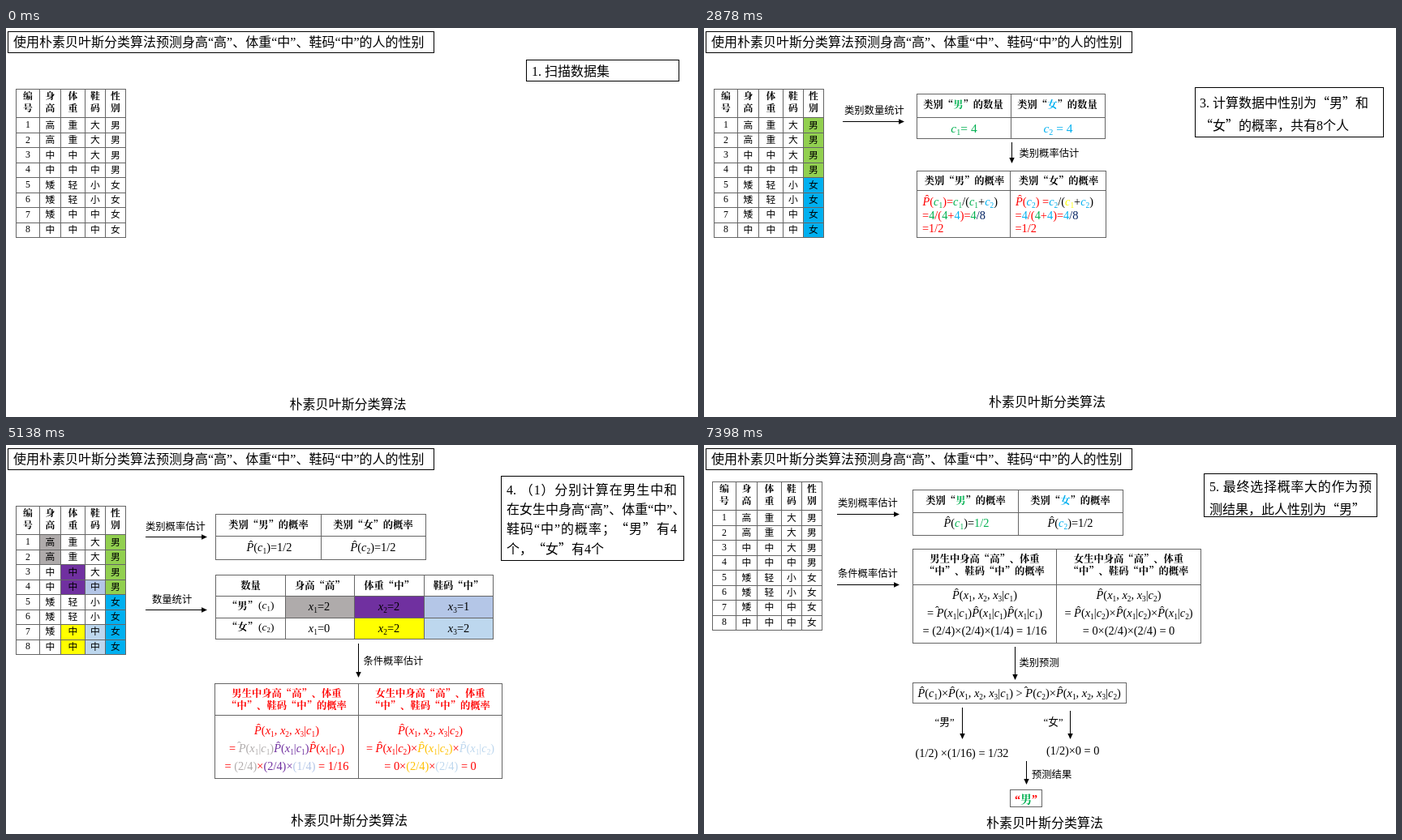
Animation of 853x480 px, one loop 7.85 s. Source, as an HTML page:

```html
<!DOCTYPE html>
<html lang="zh-CN">
<head>
<meta charset="utf-8">
<title>朴素贝叶斯分类算法</title>
<style>
  html, body { margin: 0; width: 100%; height: 100%; overflow: hidden; background: #fff; }
  svg { display: block; width: 853px; height: 480px; }
  svg, .note {
    font-family: "Liberation Serif", "Noto Sans CJK SC", serif;
    text-spacing-trim: space-all;
  }
  text { white-space: pre; }
  .wide { font-family: "Noto Sans CJK SC", serif; line-height: 0; }
  .bold { font-weight: 700; font-family: "Liberation Serif", "Noto Serif CJK SC", "Noto Sans CJK SC", serif; }
  .bold .wide { font-family: "Noto Serif CJK SC", "Noto Sans CJK SC", serif; }
  .note div { height: 24px; font-size: 16px; line-height: 24px; white-space: nowrap; position: absolute; left: 0; right: 0; }
  .note .full { text-align: justify; text-align-last: justify; }
</style>
</head>
<body>
<svg id="stage" viewBox="0 0 853 480"></svg>
<script>
const NS = 'http://www.w3.org/2000/svg';
const stage = document.getElementById('stage');
const RULE = '#666';
const INK = {
  k: '#000', r: '#f00', g: '#00b050', b: '#00b0f0', y: '#ffff00', o: '#ffc000',
  a: '#afabab', p: '#7030a0', l: '#b4c6e7', s: '#bdd7ee', m: '#92d050', n: '#002060'
};
let layer = stage;

function add(tag, attrs, parent = layer) {
  const el = document.createElementNS(NS, tag);
  for (const k in attrs) el.setAttribute(k, attrs[k]);
  parent.appendChild(el);
  return el;
}

// Markup: {r ...} colours a run, 「」 are full-width quotes, c1/x2 get a
// subscript, P is P-hat and p is P with its hat slipped to the left.
function text(x, y, str, size = 14.4, { mid = false, bold = false, ink = 'k' } = {}) {
  const el = add('text', {
    x, y, 'font-size': size, fill: INK[ink],
    'text-anchor': mid ? 'middle' : 'start', class: bold ? 'bold' : ''
  });
  let dx = 0, dy = 0, fill = INK[ink];
  const run = (s, attrs = {}) => {
    add('tspan', { dx, dy, fill, ...attrs }, el).textContent = s;
    dx = dy = 0;
  };
  for (const t of str.match(/\{\w |\}|[「」]|[cx]\d|[Pp]|[^{}「」cxPp]+/g)) {
    if (t[0] === '{') fill = INK[t[1]];
    else if (t === '}') fill = INK[ink];
    else if (t === '「' || t === '」') run(t === '「' ? '“' : '”', { class: 'wide' });
    else if (/[cx]\d/.test(t)) {
      run(t[0], { 'font-style': 'italic' });
      dy = size * 0.19;
      run(t[1], { 'font-size': size * 0.65 });
      dy = -size * 0.19;
    } else if (t === 'P' || t === 'p') {
      const back = size * (t === 'P' ? 0.4 : 0.73);
      run('P', { 'font-style': 'italic' });
      dx = -back; dy = -size * 0.19;
      run('ˆ');
      dx = back - size * 0.333; dy = size * 0.19;
    } else run(t);
  }
}

const label = (x, cy, s, size = 12.3) => text(x, cy + size * 0.38, s, size);
const head = (x, cy, s, ink) => text(x, cy + 4.6, s, 12.3, { mid: true, bold: true, ink });
const cell = (x, y, s, ink) => text(x, y, s, 14.4, { mid: true, ink });

function box(x0, y0, x1, y1, stroke = '#000') {
  add('rect', { x: x0, y: y0, width: x1 - x0, height: y1 - y0, fill: 'none', stroke });
}

function paint(xs, ys, col, row, key) {
  add('rect', {
    x: xs[col], y: ys[row], width: xs[col + 1] - xs[col],
    height: ys[row + 1] - ys[row], fill: INK[key]
  });
}

function grid(xs, ys) {
  const [x0, x1, y0, y1] = [xs[0], xs.at(-1), ys[0], ys.at(-1)];
  const d = xs.map(x => `M${x} ${y0}V${y1}`).join('') + ys.map(y => `M${x0} ${y}H${x1}`).join('');
  add('path', { d, stroke: RULE, fill: 'none', 'stroke-linecap': 'square' });
}

function arrow(x0, y0, x1, y1) {
  const across = y0 === y1;
  const [ex, ey] = across ? [x1 - 5, y1] : [x1, y1 - 5];
  add('path', { d: `M${x0} ${y0}L${ex} ${ey}`, stroke: '#000' });
  add('path', { d: across ? `M${x1} ${y1}l-7 -3.2v6.4z` : `M${x1} ${y1}l-3.2 -7h6.4z` });
}

// Lines that start with | are justified to the full width.
function note(rect, x, right, cy, pitch, lines) {
  box(...rect);
  const fo = add('foreignObject', { x, y: 0, width: right - x, height: 160, style: 'overflow:visible' });
  const wrap = document.createElement('div');
  wrap.className = 'note';
  wrap.style.cssText = 'position:relative;height:160px';
  lines.forEach((line, i) => {
    const div = document.createElement('div');
    div.style.top = cy - 11.4 + i * pitch + 'px';
    if (line[0] === '|') div.className = 'full';
    div.innerHTML = line.replace('|', '')
      .replace(/「/g, '<span class="wide">“</span>')
      .replace(/」/g, '<span class="wide">”</span>');
    wrap.appendChild(div);
  });
  fo.appendChild(wrap);
}

const PEOPLE = ['高重大男', '高重大男', '中中大男', '中中中男', '矮轻小女', '矮轻小女', '矮中中女', '中中中女'];
const SEX = ['4 1 m', '4 2 m', '4 3 m', '4 4 m', '4 5 b', '4 6 b', '4 7 b', '4 8 b'];
const TRAITS = [...SEX, '1 1 a', '1 2 a', '2 3 p', '2 4 p', '3 4 l', '2 7 y', '2 8 y', '3 7 s', '3 8 s'];

function people(fills = [], dx = 0, dy = 0) {
  const xs = [12.5, 41.5, 67.5, 97.5, 122.5, 147.5].map(x => x + dx);
  const ys = [75.5];
  for (let i = 0; i < 9; i++) ys.push(Math.round(110 + i * 18.5) + 0.5);
  const rows = ys.map(y => y + dy);
  const put = (col, cy, s, bold) =>
    text((xs[col] + xs[col + 1]) / 2, cy + 4.4, s, 11.8, { mid: true, bold });
  for (const f of fills) {
    const [c, r, key] = f.split(' ');
    paint(xs, rows, +c, +r, key);
  }
  grid(xs, rows);
  ['编号', '身高', '体重', '鞋码', '性别'].forEach((s, c) => {
    put(c, 84 + dy, s[0], true);
    put(c, 99 + dy, s[1], true);
  });
  PEOPLE.forEach((p, r) => {
    const cy = 119.3 + r * 18.45 + dy;
    put(0, cy - 0.6, String(r + 1));
    [...p].forEach((s, c) => put(c + 1, cy, s));
  });
}

const tint = (on, key, s) => on ? `{${key} ${s}}` : s;

function counts(ys, headY, base) {
  grid([262.5, 378.5, 494.5], ys);
  head(319.5, headY, '类别「{g 男}」的数量');
  head(435.5, headY, '类别「{b 女}」的数量');
  text(320.5, base, 'c1= 4', 15.5, { mid: true, ink: 'g' });
  text(436.5, base, 'c2 = 4', 15.5, { mid: true, ink: 'b' });
}

function priors(x, ys, headY, base, color) {
  grid([x, x + 130, x + 259], ys);
  head(x + 65, headY, `类别「${tint(color, 'g', '男')}」的概率`);
  head(x + 194, headY, `类别「${tint(color, 'b', '女')}」的概率`);
  cell(x + 66, base, `P(${tint(color, 'g', 'c1')})=${tint(color, 'g', '1/2')}`);
  cell(x + 194, base, `P(${tint(color, 'b', 'c2')})=1/2`);
}

function traits(ink) {
  const xs = [258.5, 344.5, 429.5, 515.5, 600.5], ys = [160.5, 186.5, 213.5, 239.5];
  [[1, 1, 'a'], [2, 1, 'p'], [3, 1, 'l'], [2, 2, 'y'], [3, 2, 's']].forEach(f => paint(xs, ys, ...f));
  grid(xs, ys);
  ['数量', '身高「高」', '体重「中」', '鞋码「中」'].forEach((s, i) => head(301.5 + i * 85.3, 173, s));
  ['男', '女'].forEach((sex, r) => {
    const cy = 198 + r * 26.5;
    head(291.5, cy, `「${sex}」`, ink);
    text(311, cy + 4, `(c${r + 1})`, 13.5, { ink });
  });
  ['221', '022'].forEach((row, r) => [...row].forEach((n, i) =>
    cell(386 + i * 86, 204 + r * 27, `x${i + 1}=${n}`, ink)));
}

function likelihood(xs, ys, headY, base, color) {
  const ink = color ? 'r' : 'k';
  const t = (key, s) => tint(color, key, s);
  const [a, b] = [(xs[0] + xs[1]) / 2, (xs[1] + xs[2]) / 2];
  grid(xs, ys);
  [[a, '男'], [b, '女']].forEach(([x, sex]) => {
    head(x, headY, sex + '生中身高「高」、体重', ink);
    head(x, headY + 15, '「中」、鞋码「中」的概率', ink);
  });
  const A = 'P(x1|c1)', B = 'P(x1|c2)';
  cell(a, base, 'P(x1, x2, x3|c1)', ink);
  cell(a, base + 22, `= ${t('a', 'p(x1|c1)')}${t('p', A)}${A}`, ink);
  cell(a, base + 44, `= ${t('a', '(2/4)')}×${t('p', '(2/4)×')}${t('l', '(1/4)')} = 1/16`, ink);
  cell(b, base, 'P(x1, x2, x3|c2)', ink);
  cell(b, base + 22, `= ${B}×${t('o', B)}×${t('s', B)}`, ink);
  cell(b, base + 44, `= 0×${t('o', '(2/4)')}×${t('s', '(2/4)')} = 0`, ink);
}

const COMPARE = 'P(c1)×P(x1, x2, x3|c1) > p(c2)×P(x1, x2, x3|c2)';
const MALE = '(1/2) ×(1/16) = 1/32', FEMALE = '(1/2)×0 = 0';
const caption = (x, cy) => label(x, cy, '朴素贝叶斯分类算法', 16);

const scenes = [
  [1070, () => {
    people();
    note([641.5, 39.5, 829.5, 65.5], 648, 824, 53, 24, ['1. 扫描数据集']);
    caption(349.5, 464);
  }],
  [1130, () => {
    people(SEX);
    label(165, 96, '类别数量统计');
    arrow(165, 109.5, 240, 109.5);
    counts([77.5, 105.5, 132.5], 90, 124);
    note([635.5, 45.5, 822.5, 98.5], 641, 816, 62, 24.5, ['|2. 统计数据中性别为', '「男」和「女」的数量']);
    caption(349.5, 464);
  }],
  [1130, () => {
    people(SEX);
    label(173, 101, '类别数量统计');
    arrow(171, 115.5, 247, 115.5);
    counts([81.5, 110.5, 136.5], 94, 129);
    arrow(379.5, 141, 379.5, 167);
    label(388.5, 154.5, '类别概率估计');
    grid([262.5, 377.5, 495.5], [176.5, 200.5, 258.5]);
    head(321, 188, '类别「男」的概率');
    head(437, 188, '类别「女」的概率');
    text(269.5, 219, '{r P(}{g c1}{r )=}{g c1}/({g c1}+{b c2})');
    text(269, 235.5, '{r =}{g 4}{r /(}{g 4}{r +}{b 4}{r )=}{g 4}{n /8}');
    text(384, 219, '{r P(}{b c2}{r ) =}{b c2}/({y c1}+{b c2})');
    text(383.5, 235.5, '{r =}{b 4}{r /(}{g 4}{r +}{b 4}{r )=}{b 4}{n /8}');
    text(269, 252, '=1/2', 14.4, { ink: 'r' });
    text(383.5, 252, '=1/2', 14.4, { ink: 'r' });
    note([605.5, 73.5, 837.5, 134.5], 611, 832, 92, 28, ['3. 计算数据中性别为「男」和', '「女」的概率，共有8个人']);
    caption(351, 461);
  }],
  [1130, () => {
    people(TRAITS);
    label(172, 98, '类别概率估计');
    arrow(169, 113.5, 246, 113.5);
    priors(258.5, [85.5, 112.5, 141.5], 98, 131);
    label(180, 190, '数量统计');
    arrow(167, 205.5, 244, 205.5);
    traits('r');
    note([610.5, 44.5, 838.5, 122.5], 617, 831, 61, 24.3,
      ['|3. 分别统计在男生中和在女生', '|中身高「高」、体重「中」、', '鞋码「中」的数量']);
    caption(355, 464.5);
  }],
  [1130, () => {
    people(TRAITS);
    label(172, 100, '类别概率估计');
    arrow(172, 113.5, 248, 113.5);
    priors(258.5, [85.5, 112.5, 141.5], 98, 131);
    label(180, 190, '数量统计');
    arrow(172, 203.5, 248, 203.5);
    traits('k');
    arrow(434.5, 245, 434.5, 287);
    label(440.5, 266.5, '条件概率估计');
    likelihood([257.5, 434.5, 611.5], [294.5, 333.5, 411.5], 306.5, 357, true);
    note([610.5, 38.5, 835.5, 142.5], 617, 827, 55, 24.4,
      ['|4. （1）分别计算在男生中和', '在女生中身高“高”、体重“中”、', '|鞋码“中”的概率；「男」有4', '个，「女」有4个']);
    caption(351, 463);
  }],
  [1130, () => {
    people();
    label(166, 99.5, '类别概率估计');
    arrow(166, 114.5, 242, 114.5);
    priors(258.5, [85.5, 112.5, 140.5], 98, 131, true);
    label(166, 187.5, '条件概率估计');
    arrow(166, 202.5, 242, 202.5);
    likelihood([258.5, 436.5, 612.5], [157.5, 201.5, 274.5], 169.5, 219);
    arrow(384.5, 280, 384.5, 321);
    label(390.5, 301.5, '类别预测');
    box(261.5, 327.5, 525.5, 352.5, RULE);
    text(268, 344, COMPARE, 14.4, { ink: 'r' });
    arrow(322.5, 357, 322.5, 396);
    arrow(457.5, 358, 457.5, 396);
    label(282, 374, '{r “}{g 男}{r ”}', 12.8);
    label(421.5, 374, '{r “}{b 女}{r ”}', 12.8);
    text(265, 417.5, MALE, 14.3, { ink: 'm' });
    text(428, 416, FEMALE, 14.3, { ink: 'b' });
    note([599.5, 39.5, 832.5, 142.5], 605, 827, 55, 24.4,
      ['|4. （2）比较此人性别为「男」', '|和「女」时，身高为「高」、', '|体重为「中」、鞋码为「中」', '的概率，概率大这为预测结果']);
    caption(349, 464);
  }],
  [1130, () => {
    people([], -2, -30);
    label(165, 71, '类别概率估计');
    arrow(164, 85.5, 241, 85.5);
    priors(257.5, [55.5, 83.5, 111.5], 68, 101, true);
    label(165, 158.5, '条件概率估计');
    arrow(164, 172.5, 241, 172.5);
    likelihood([257.5, 434.5, 612.5], [128.5, 172.5, 244.5], 140.5, 190);
    arrow(383.5, 249, 383.5, 290);
    label(388.5, 268.5, '类别预测');
    box(257.5, 293.5, 520.5, 318.5, RULE);
    text(263.5, 311, COMPARE);
    arrow(318.5, 324, 318.5, 363);
    arrow(451.5, 328, 451.5, 363);
    label(284.5, 341.5, '“男”', 12.8);
    label(418.5, 341.5, '“女”', 12.8);
    text(260.5, 384.5, MALE, 14.3);
    text(422, 382, FEMALE, 14.3);
    arrow(397.5, 390, 397.5, 419);
    label(404, 406, '预测结果');
    box(377.5, 425.5, 416.5, 446.5, RULE);
    text(397, 442, '{r “}{g 男}{r ”}', 14, { mid: true, bold: true });
    note([616.5, 35.5, 829.5, 88.5], 623, 823, 51, 28, ['|5. 最终选择概率大的作为预', '测结果，此人性别为「男」']);
    caption(348, 465.5);
  }]
];

box(2.5, 4.5, 527.5, 30.5);
label(9, 17, '使用朴素贝叶斯分类算法预测身高“高”、体重“中”、鞋码“中”的人的性别', 16);

let total = 0;
const slides = scenes.map(([ms, draw], i) => {
  const g = layer = add('g', { display: i ? 'none' : 'inline' }, stage);
  draw();
  total += ms;
  return { g, end: total };
});

let start = null, shown = 0;
function tick(now) {
  start ??= now;
  const t = (now - start) % total;
  const next = slides.findIndex(s => t < s.end);
  if (next !== shown) {
    slides[shown].g.setAttribute('display', 'none');
    slides[next].g.setAttribute('display', 'inline');
    shown = next;
  }
  requestAnimationFrame(tick);
}
requestAnimationFrame(tick);
</script>
</body>
</html>
```
